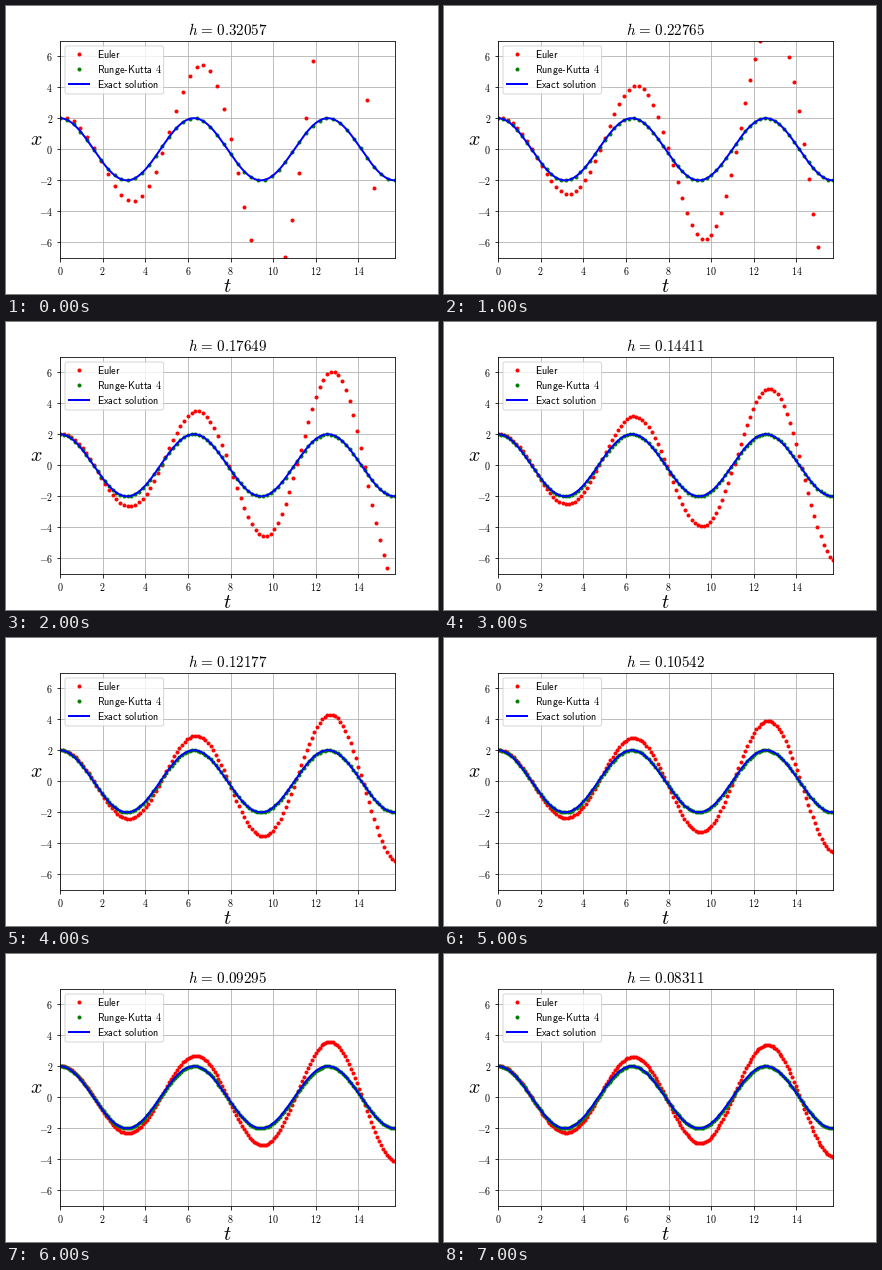
Recreate the animation shown at these times as a matplotlib script. Size 432 px wide and 288 px high, loop 8000 ms.

```python
import numpy as np
import matplotlib.pyplot as plt
from matplotlib.animation import FuncAnimation
from matplotlib.lines import Line2D
from matplotlib.patches import FancyBboxPatch
from matplotlib.transforms import Affine2D

W, H, DPI = 432, 288, 72
T_END = 5 * np.pi
X0 = 2.0

plt.rcParams.update({
    "mathtext.fontset": "cm",
    "font.family": "Liberation Sans",
    "font.size": 10,
})

fig = plt.figure(figsize=(W / DPI, H / DPI), dpi=DPI, facecolor="white")
ax = fig.add_axes([0.125, 0.125, 0.775, 0.755])
px = Affine2D().scale(1 / W, -1 / H).translate(0, 1) + fig.transFigure

ax.set_xlim(0, T_END)
ax.set_ylim(-7, 7)
xticks, yticks = range(0, 15, 2), range(-6, 7, 2)
ax.set_xticks(xticks, [f"${v}$" for v in xticks])
ax.set_yticks(yticks, [f"${v}$" for v in yticks])
ax.grid(True)


def label(x, y, text, size, ha="left"):
    ax.text(x, y, text, size=size, ha=ha, va="baseline",
            transform=px, zorder=6)


label(221.4, 286, "$t$", 20, "center")
label(30.7, 139, "$x$", 20, "center")
title = ax.set_title("", fontsize=15)

euler, = ax.plot([], [], "r.")
rk4, = ax.plot([], [], "g.")
t_fine = np.linspace(0, T_END, 1000)
ax.plot(t_fine, X0 * np.cos(t_fine), "b-", lw=2)


def draw_legend():
    ax.add_artist(FancyBboxPatch(
        (59, 40), 98.6, 48, boxstyle="round,pad=0,rounding_size=2",
        fc="white", ec="0.8", lw=1, alpha=0.8, transform=px, zorder=5))
    rows = [
        (r"$\mathsf{Euler}$", "r."),
        (r"$\mathsf{Runge}$-$\mathsf{Kutta}\hspace{0.38}\mathsf{4}$", "g."),
        (r"$\mathsf{Exact}\hspace{0.42}\mathsf{solution}$", "b-"),
    ]
    for i, (text, (color, style)) in enumerate(rows):
        y = 48.4 + 15 * i
        if style == ".":
            handle = Line2D([73], [y], color=color, marker=".", ls="")
        else:
            handle = Line2D([63, 83], [y, y], color=color, lw=2)
        handle.set(transform=px, zorder=6)
        ax.add_artist(handle)
        label(91, 52 + 15 * i, text, 10.2)


draw_legend()


def solve(growth, n):
    """Numerical x(t) for x'' = -x, given the complex growth per step."""
    return X0 * (growth ** np.arange(n)).real


def update(i):
    n = 50 + 20 * i
    t = np.linspace(0, T_END, n)
    h = T_END / (n - 1)
    z = 1j * h
    euler.set_data(t, solve(1 + z, n))
    rk4.set_data(t, solve(1 + z + z**2 / 2 + z**3 / 6 + z**4 / 24, n))
    title.set_text(rf"$h\hspace{{0.116}}=\hspace{{0.116}}{h:.5f}$")
    return euler, rk4, title


anim = FuncAnimation(fig, update, frames=8, interval=1000, repeat=True)
plt.show()
```
